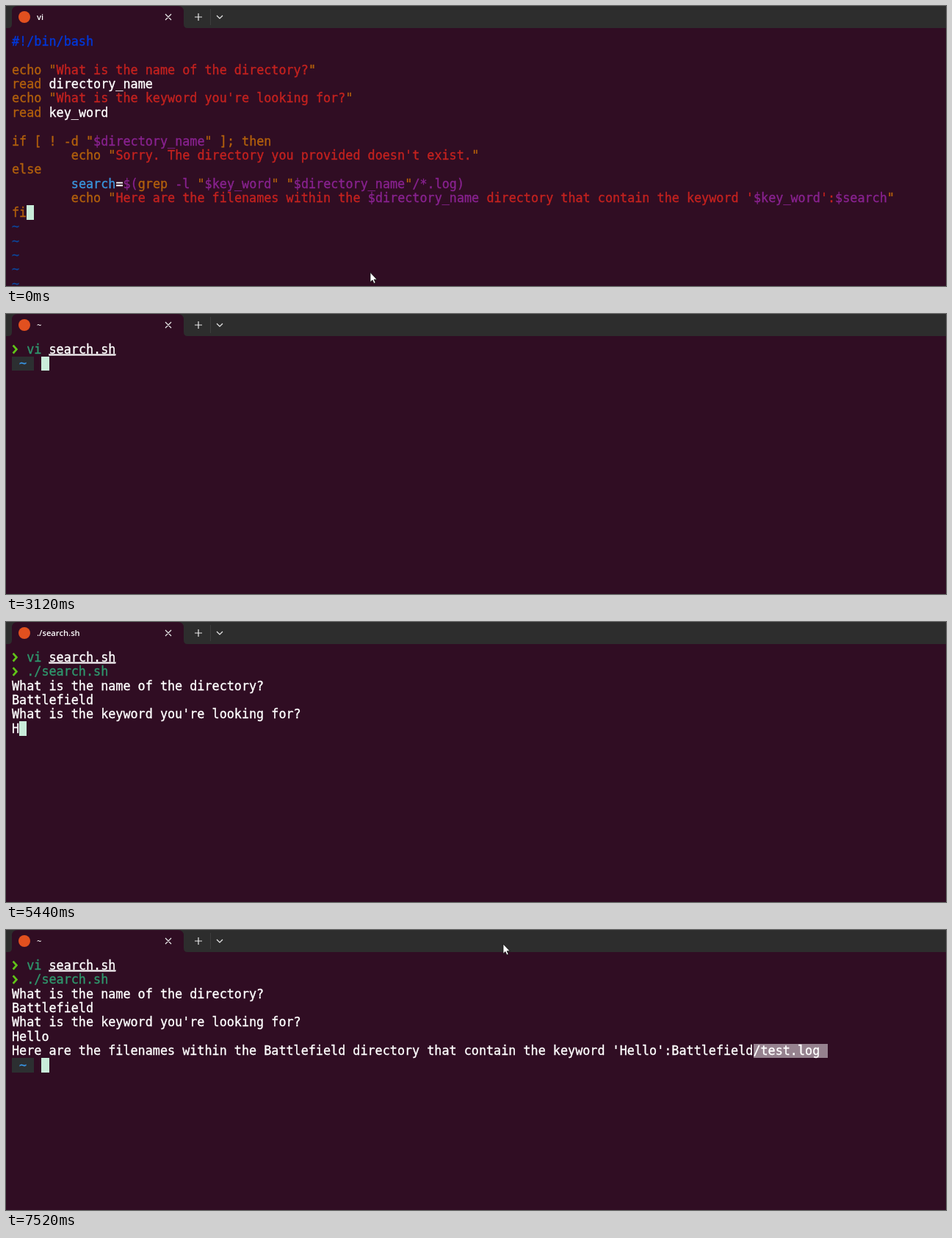
Animation, 1280 px wide and 381 px high, one loop 7.6 s. Source, as an HTML page:

```html
<!DOCTYPE html>
<html lang="en">
<head>
<meta charset="utf-8">
<title>Shell script search</title>
<style>
html, body { margin: 0; width: 100%; height: 100%; overflow: hidden; background: #300d23; }
svg { display: block; width: 100%; height: 100%; }
text { white-space: pre; }
.mono { font: 16.78px "DejaVu Sans Mono", "Noto Sans Mono", monospace; font-variant-ligatures: none; }
.mono text { stroke-width: .35; }
#title { font: 600 11.2px "Open Sans", "Noto Sans", sans-serif; fill: #fff; }
.icon { fill: none; stroke: #e8e8e8; stroke-width: 1.2; }
</style>
</head>
<body>
<svg viewBox="0 0 1280 381">
  <rect width="1280" height="381" fill="#300d23"/>
  <rect width="1280" height="30" fill="#2d2d2d"/>
  <path d="M3 30Q8 30 8 25V8Q8 0 16 0H234Q242 0 242 8V25Q242 30 247 30Z" fill="#300d23"/>
  <circle cx="25" cy="15" r="8" fill="#e1501f"/>
  <text id="title" x="42" y="19"></text>
  <path class="icon" d="M217 11l8 8m0-8l-8 8M257 15h10m-5-5v10M287 13l4 4 4-4"/>
  <path d="M278.500 4V26" stroke="#3d3d3d"/>
  <g id="screen" class="mono"></g>
  <path id="mouse" d="M0 0V13.200L3 10.500 5 15 7.200 14 5.200 9.700H9.200Z" fill="#fff" stroke="#111" stroke-width=".8"/>
</svg>
<script>
const LOOP = 7600, STEP = 80;
const LEFT = 8, TOP = 38.3, CELL = 10.1, ROW = 19.42, BASE = 15.4;
const COLORS = {
  b: '#0037da', o: '#b2600c', r: '#c4221f', p: '#88228f', c: '#3a96dd',
  t: '#0c479c', w: '#ffffff', u: '#ffffff', g: '#2f966c', d: '#3a96e6'
};

// {x} switches to colour x; u is underlined white
const SCRIPT = [
  '{b}#!/bin/bash',
  '',
  '{o}echo "{r}What is the name of the directory?{o}"',
  '{o}read {w}directory_name',
  '{o}echo "{r}What is the keyword you\'re looking for?{o}"',
  '{o}read {w}key_word',
  '',
  '{o}if [ ! -d "{p}$directory_name{o}" ]; then',
  '{o}        echo "{r}Sorry. The directory you provided doesn\'t exist.{o}"',
  '{o}else',
  '{c}        search{w}={p}$({o}grep{p} -l {o}"{p}$key_word{o}" "{p}$directory_name{o}"{p}/*.log)',
  '{o}        echo "{r}Here are the filenames within the {p}$directory_name{r} directory that contain the keyword \'{p}$key_word{r}\':{p}$search{o}"',
  '{o}fi',
  ...Array(5).fill('{t}~')
];

const COMMAND = './search.sh', FOLDER = 'Battlefield', KEYWORD = 'Hello';
const RESULT = `Here are the filenames within the ${FOLDER} directory that contain the keyword '${KEYWORD}':${FOLDER}/test.log`;

// time, x, y of the pointer tip
const POINTER = [
  [6160, 962, 156], [6240, 970, 150], [6400, 984, 156], [6560, 1019, 162],
  [6960, 1109, 162], [7120, 1109, 162], [7200, 1060, 122], [7360, 800, 14],
  [7440, 710, 8], [7520, 677, 19]
];

const $ = id => document.getElementById(id);
const colX = col => LEFT + col * CELL;
const rowY = row => TOP + row * ROW;
const escapeText = s => s.replace(/&/g, '&amp;').replace(/</g, '&lt;');

function cells(row, col, count, fill) {
  const x = Math.round(colX(col)), y = Math.round(rowY(row));
  const w = Math.round(colX(col + count)) - x, h = Math.round(rowY(row + 1)) - y;
  return `<rect x="${x}" y="${y}" width="${w}" height="${h}" fill="${fill}"/>`;
}
const caret = (row, col) => cells(row, col, 1, '#c9ecda');

function line(row, markup, col = 0) {
  const parts = markup.split(/\{(\w)\}/);
  let out = '';
  for (let i = 1; i < parts.length; i += 2) {
    const [key, str] = [parts[i], parts[i + 1]];
    const indent = str.length - str.trimStart().length;
    const deco = key === 'u' ? ' text-decoration="underline"' : '';
    const color = COLORS[key];
    out += `<text x="${colX(col + indent)}" y="${rowY(row) + BASE}" fill="${color}" stroke="${color}"${deco}>${escapeText(str.trim())}</text>`;
    col += str.length;
  }
  return out;
}

const arrow = row =>
  `<path d="M9.600 ${rowY(row) + 4.4}l4.800 5.400-4.800 5.400" fill="none" stroke="#60c418" stroke-width="2.700"/>`;
const prompt = row => cells(row, 0, 3, '#2c2f31') + line(row, '{d}~', 1);
const typed = (str, t, start, pace) =>
  str.slice(0, Math.max(0, Math.floor((t - start) / pace) + 1));

function editor(t) {
  const cursor = t < 2240 ? caret(12, 2) : t < 2480 ? caret(12, 1) : '';
  return cursor + SCRIPT.map((s, row) => line(row, s)).join('');
}

function shell(t) {
  let out = arrow(0) + line(0, '{g}vi {u}search.sh', 2);
  if (t < 3040) return out + caret(1, 0);
  if (t < 4000) {
    const str = typed(COMMAND, t, 3440, 36);
    return out + prompt(1) + line(1, '{g}' + str, 4) + caret(1, 4 + str.length);
  }
  out += arrow(1) + line(1, '{g}' + COMMAND, 2);
  if (t < 4080) return out + caret(2, 0);

  const folder = typed(FOLDER, t, 4240, STEP);
  out += line(2, '{w}What is the name of the directory?') + line(3, '{w}' + folder);
  if (t < 5200) return out + caret(3, folder.length);

  const keyword = typed(KEYWORD, t, 5440, STEP);
  out += line(4, "{w}What is the keyword you're looking for?") + line(5, '{w}' + keyword);
  if (t < 5920) return out + caret(5, keyword.length);

  const picked = Math.round(10 * Math.min(1, Math.max(0, (t - 6560) / 400)));
  if (picked) out += cells(6, 100, picked, '#96828f');
  out += line(6, '{w}' + RESULT);
  return out + (t < 6000 ? caret(7, 0) : prompt(7) + caret(7, 4));
}

function pointer(t) {
  if (t < 2240) return [496, 362.5];
  if (t < POINTER[0][0]) return null;
  const i = POINTER.findIndex(p => p[0] > t);
  if (i < 0) return POINTER.at(-1).slice(1);
  const [a, b] = [POINTER[i - 1], POINTER[i]];
  const k = (t - a[0]) / (b[0] - a[0]);
  return [a[1] + (b[1] - a[1]) * k, a[2] + (b[2] - a[2]) * k];
}

let shown = -1;
function frame() {
  const t = Math.floor(performance.now() % LOOP / STEP) * STEP;
  if (t !== shown) {
    shown = t;
    $('title').textContent = t < 2960 ? 'vi' : t >= 4080 && t < 6000 ? COMMAND : '~';
    $('screen').innerHTML = t < 2960 ? editor(t) : shell(t);
    const spot = pointer(t);
    $('mouse').style.display = spot ? '' : 'none';
    if (spot) $('mouse').setAttribute('transform', `translate(${spot})`);
  }
  requestAnimationFrame(frame);
}
frame();
</script>
</body>
</html>
```
